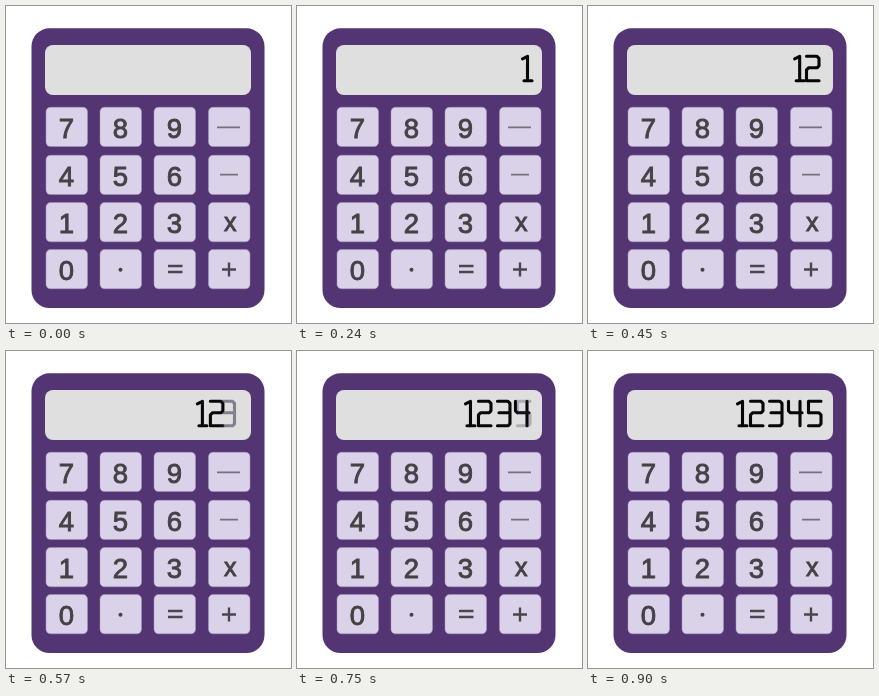
Animation of 285x317 px, one loop 1.17 s. Source, as an HTML page:

```html
<!DOCTYPE html>
<html lang="en">
<head>
<meta charset="utf-8">
<title>Calculator</title>
<style>
  html, body { margin: 0; width: 100%; height: 100%; overflow: hidden; background: #fff; }
  svg { display: block; width: 285px; height: 317px; }
  .key { fill: #dad2e8; stroke: #a797bf; stroke-width: .5; }
  .label { font: 27.5px "Liberation Sans", Arial, sans-serif; fill: #454145; stroke: #454145; stroke-width: .9; text-anchor: middle; }
  .sign { fill: none; stroke: #4b464d; stroke-width: 2.4; }
  .thin { stroke: #77707d; stroke-width: 1.7; }
  .digit { fill: none; stroke-width: 3.1; stroke-linejoin: round; stroke-linecap: round; }
</style>
</head>
<body>
<svg viewBox="0 0 285 317">
  <rect x="25.5" y="22.300" width="233" height="279.700" rx="18" fill="#533573"/>
  <rect x="39" y="39" width="206" height="50" rx="8" fill="#dfdfe0"/>
  <g id="keys"></g>
  <g class="sign">
    <path class="thin" d="M211 121.400h23M214 168.700h18"/>
    <path d="M162 260h14.500M162 266h14.500M216 263.500h14M223 256.500v14"/>
  </g>
  <circle cx="114.500" cy="263.700" r="2" fill="#454145"/>
  <g id="row"></g>
</svg>
<script>
  const NS = "http://www.w3.org/2000/svg";
  const LOOP = 1170, STEP = 30;
  const clamp = (v, lo, hi) => Math.min(hi, Math.max(lo, v));

  function add(parent, tag, attrs, text = "") {
    const el = document.createElementNS(NS, tag);
    for (const name in attrs) el.setAttribute(name, attrs[name]);
    el.textContent = text;
    parent.append(el);
    return el;
  }

  const keys = document.getElementById("keys");
  const colX = [40, 94, 148, 202.5];
  const rowY = [101.3, 149.3, 196.6, 243.6];
  ["789 ", "456 ", "123x", "0   "].forEach((line, r) => {
    [...line].forEach((label, c) => {
      add(keys, "rect", { class: "key", x: colX[c], y: rowY[r], width: 41.5, height: 39.2, rx: 4.5 });
      if (label === " ") return;
      const small = label === "x";
      add(keys, "text", {
        class: "label", x: colX[c] + (small ? 21.7 : 20.3), y: rowY[r] + (small ? 28 : 30.6),
        style: small ? "font-size:25px" : ""
      }, label);
    });
  });

  // offset: place in the row; home: where the digit appears; from/fade: its fade-in
  const digits = [
    { d: "M1.500 4L6.500 1.500V26M3 26H11", offset: 0, home: 224, from: 0, fade: 240 },
    { d: "M1.500 1.500H12L14 3.500V11L12 13H3.500L1.500 15V26H14", offset: 13, home: 217, from: 240, fade: 210 },
    { d: "M1.500 1.500H12L14 3.500V24L12 26H1.500M3 13H14", offset: 32, home: 214.5, from: 480, fade: 180 },
    { d: "M1.500 1.500V11L3.500 13H15M13 1.500V26", offset: 51, home: 217, from: 600, fade: 135 },
    { d: "M14 1.500H1.500V13H12L14 15V24L12 26H1.500", offset: 71, home: 219, from: 720, fade: 105 }
  ];
  const row = document.getElementById("row");
  for (const g of digits) g.el = add(row, "path", { class: "digit", d: g.d });

  function draw(t) {
    const left = clamp(224 - (t - 302) * 0.1273, 148, 224);
    for (const g of digits) {
      const p = clamp((t - g.from) / g.fade, 0, 1);
      const ink = [78, 58, 112].map(v => Math.round(v * (1 - p) + 6 * p));
      g.el.setAttribute("transform", `translate(${Math.min(g.home, left + g.offset)} 48.8)`);
      g.el.setAttribute("stroke", `rgb(${ink})`);
      g.el.setAttribute("opacity", p);
    }
  }

  const start = performance.now();
  function tick(now) {
    const t = Math.max(0, now - start) % LOOP;
    draw(Math.min(900, Math.floor(t / STEP) * STEP));
    requestAnimationFrame(tick);
  }
  draw(0);
  requestAnimationFrame(tick);
</script>
</body>
</html>
```
